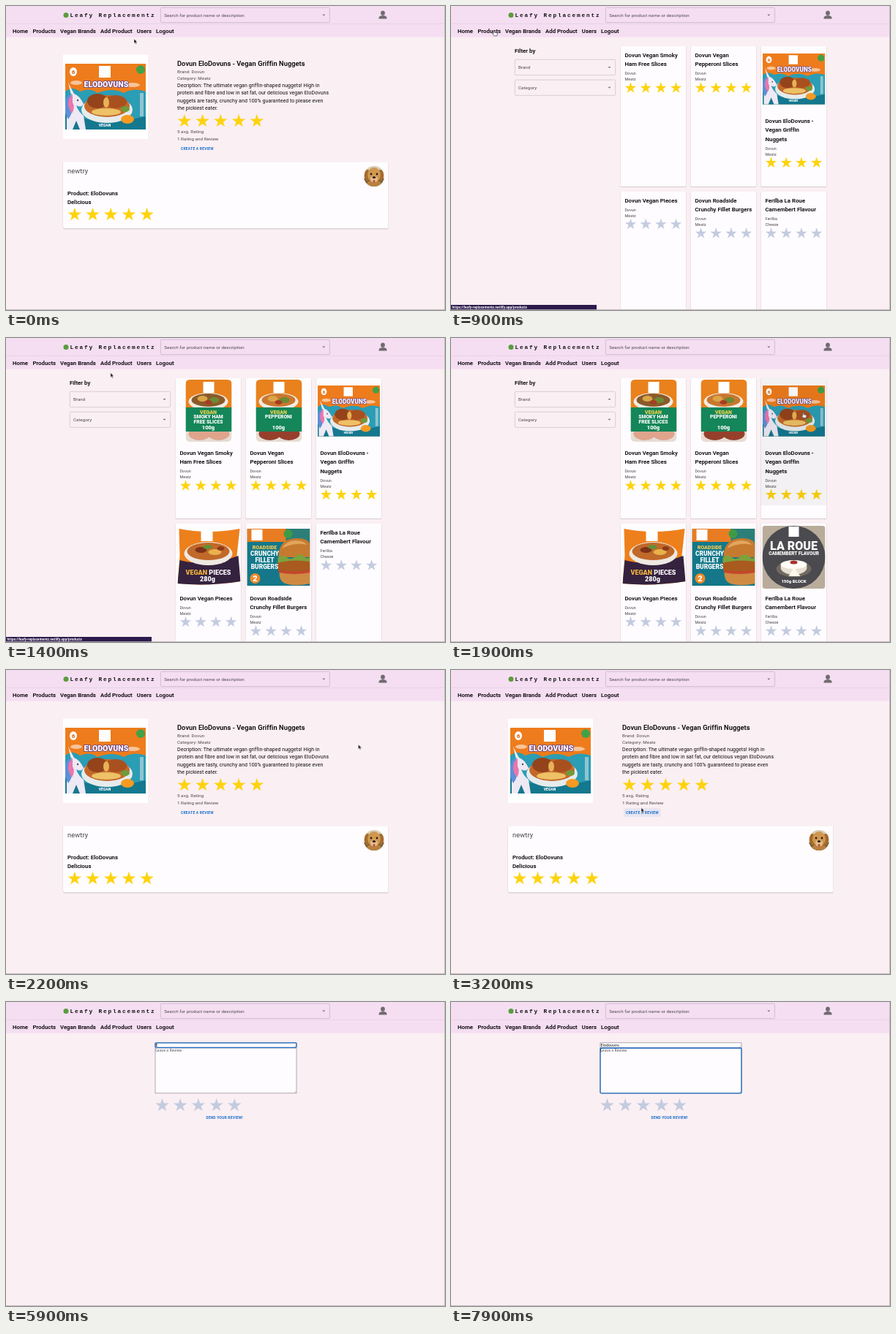
Write an HTML page that moves like this. It is 600 by 416 pixels and loops after 8 s.

```html
<!DOCTYPE html>
<html lang="en">
<head>
<meta charset="utf-8">
<title>Leafy Replacementz</title>
<style>
  html, body { margin: 0; width: 100%; height: 100%; overflow: hidden; background: #faeff3; }
  svg { display: block; width: 100%; height: 100%; }
  text { font-family: Roboto, sans-serif; letter-spacing: .0085em; fill: #0c0a0c; white-space: pre; }
  .grey { fill: #4c464b; }
  .mid { font-weight: 500; fill: #080608; stroke: #080608; stroke-width: .1px; }
  .button { font-weight: 600; fill: #1a6fcb; letter-spacing: .18px; }
  .brand { font: bold 7.8px "Liberation Mono", monospace; letter-spacing: 1.82px; fill: #111; }
  .field, .typed, .status { font-family: "Noto Sans", sans-serif; letter-spacing: 0; }
  .typed { font-weight: 500; fill: #111; }
  .field { fill: #5a565a; }
  .status { font-weight: 600; fill: #fff; }
  .pack { font-weight: 800; fill: #fff; text-anchor: middle; letter-spacing: 0; }
</style>
</head>
<body>
<svg id="stage" viewBox="0 0 600 416" preserveAspectRatio="none"></svg>
<script>
const LOOP = 8000, STEP = 100;
const GOLD = '#fdd30d', PALE = '#c3cbdf';

// Drawing helpers
const text = (x, y, size, str, cls = '', extra = '') =>
  `<text x="${x}" y="${y}" font-size="${size}" class="${cls}" ${extra}>${str}</text>`;
const rect = (x, y, w, h, fill, extra = '') =>
  `<rect x="${x}" y="${y}" width="${w}" height="${h}" fill="${fill}" ${extra}/>`;
const oval = (x, y, rx, ry, fill) =>
  `<ellipse cx="${x}" cy="${y}" rx="${rx}" ry="${ry}" fill="${fill}"/>`;
const path = (d, fill, extra = '') => `<path d="${d}" fill="${fill}" ${extra}/>`;
const group = (id, body) => `<g id="${id}">${body}</g>`;
const outline = (x, y, w, h, color, width = 1) =>
  rect(x, y, w, h, 'none', `rx="1.5" stroke="${color}" stroke-width="${width}"`);
const arrow = (x, y) => path(`M${x - 2} ${y - 1}h4l-2 2z`, '#757075');

function star(x, y, r, fill) {
  const points = Array.from({ length: 10 }, (_, i) => {
    const a = (i / 5 - .5) * Math.PI, d = i % 2 ? r * .39 : r;
    return `${(x + d * Math.cos(a)).toFixed(2)},${(y + d * Math.sin(a)).toFixed(2)}`;
  });
  return `<polygon points="${points.join(' ')}" fill="${fill}"/>`;
}
const stars = (n, x, y, gap, r, fill) =>
  Array.from({ length: n }, (_, i) => star(x + i * gap, y, r, fill)).join('');

const paper = (x, y, w, h) =>
  rect(x - .4, y + .3, w + .8, h + .8, '#00000026', 'rx="1.8"') + rect(x, y, w, h, '#fefcfe', 'rx="1.5"');

// Package pictures
const nuggetBox =
  rect(0, 0, 110, 90, '#ee7c1c') +
  path('M0 38q10-8 20 0q14-6 24 2q20-8 36 0q14-8 30-2V90H0z', '#2b9db4') +
  path('M0 68q50 18 110 4V90H0z', '#14788f') +
  oval(15, 26, 8, 3, '#f9c39a') + oval(92, 29, 10, 3, '#f9c39a') +
  oval(57, 63, 35, 18, '#e6ebec') + oval(57, 58, 31, 15, '#c4682a') +
  oval(44, 51, 14, 10, '#94431b') + oval(69, 52, 15, 9, '#a9501f') +
  oval(56, 66, 20, 5, '#edc166') + oval(82, 62, 6, 4, '#6f9a3a') + oval(56, 53, 4, 7, '#e7b257') +
  path('M2 90V66Q0 50 8 43L4 26L12 41Q19 43 25 55Q22 61 15 57Q18 66 25 71L28 90H20L15 78L10 90z', '#eee9f4') +
  path('M9 41Q-1 44 0 58Q-1 68 4 76Q12 66 8 56Q7 47 9 41z', '#5e8fd8') +
  path('M10 42Q3 47 4 58Q6 64 9 68Q14 60 10 53z', '#e877ac') + oval(17, 50, 1, 1.2, '#3c2c50') +
  rect(46, 3, 16, 16, '#fff') +
  text(56, 32, 10.6, 'ELODOVUNS', 'pack', 'stroke="#67408a" stroke-width="1.6" paint-order="stroke"') +
  oval(11, 11, 5, 6, '#fff') + text(11, 14, 8, '6', 'pack', 'style="fill:#e06a18"') +
  oval(103, 8, 6, 6, '#43a047') + oval(85, 76, 9, 6, '#f59a23') +
  rect(102, 40, 5, 32, '#8fc4d0') + text(54, 86, 5, 'VEGAN', 'pack');

const slicesPack = (filling, slice, lines) =>
  rect(14, 2, 63, 85, '#e6dcd3', 'rx="6"') +
  path('M14 44V8q0-6 6-6h51q6 0 6 6v36z', '#e9811d') +
  oval(45, 32, 27, 12, '#f2ebe2') + oval(45, 30, 23, 9, filling) +
  oval(37, 28, 7, 4, '#d9a548') + oval(53, 30, 7, 4, '#6d8a35') + oval(45, 33, 5, 3, '#a63c24') +
  oval(33, 76, 15, 9, slice) + oval(59, 76, 15, 9, slice) + rect(14, 40, 63, 33, '#148659') +
  rect(38, 5, 15, 15, '#fff') +
  text(45, 48.5, 7, 'VEGAN', 'pack', 'style="fill:#f3d54a"') +
  lines.map((line, i) => text(45, 55 + i * 6.5, 6.8, line, 'pack')).join('') +
  text(45, 70, 7.5, '100g', 'pack');

const piecesPack =
  path('M5 7Q45 15 88 7L84 44L89 79Q45 86 3 82L6 44z', '#ee801c') +
  path('M6 50Q45 60 86 44L89 79Q45 86 3 82z', '#35223f') +
  oval(45, 41, 33, 16, '#eee9e2') + oval(45, 38, 29, 12, '#c0692a') +
  oval(35, 36, 8, 4, '#7d331a') + oval(54, 39, 9, 4, '#e8b14a') +
  oval(44, 32, 6, 3, '#5d9138') + oval(62, 34, 5, 3, '#8f3a1b') +
  rect(35, 8, 16, 16, '#fff') +
  text(45, 69.5, 9, '<tspan fill="#f2b53c">VEGAN</tspan> PIECES', 'pack') + text(44, 78.5, 9, '280g', 'pack');

const burgerPack =
  rect(2, 7, 86, 78, '#e87c22') + rect(2, 25, 86, 60, '#14788a') + rect(55, 7, 33, 30, '#2b7f78') +
  path('M45 44Q46 20 70 20Q85 20 88 28V46H45z', '#c67a30') +
  path('M50 34Q54 24 68 23Q79 23 84 29Q66 25 50 34z', '#e2a55c') +
  path('M44 47q6-6 12-1t12-1t12 0t8-2v11H44z', '#7da23c') +
  path('M43 54q22-6 45-2v14q-24 5-43 0z', '#a85a1f') + path('M46 63q20 5 42 0v5q-22 3-42 0z', '#c4462c') +
  path('M46 67q20 4 42 0v15q-22 5-36-1q-6-4-6-14z', '#cf8a42') +
  rect(8, 8, 15, 15, '#fff') + oval(58, 14, 6, 6, '#3f9a45') +
  ['ROADSIDE', 'CRUNCHY', 'FILLET', 'BURGERS'].map((w, i) =>
    text(26, 35 + i * 9, i ? 8.4 : 7, w, 'pack', i ? '' : 'style="fill:#f6c94c"')).join('') +
  oval(13, 75, 7, 7, '#ef8a28') + text(13, 79, 11, '2', 'pack');

const cheesePack =
  rect(2, 3, 86, 86, '#b9ac9b', 'rx="4"') + oval(45, 46, 43, 43, '#4b4a4e') +
  oval(45, 62, 24, 11, '#70695f') + oval(45, 60, 18, 10, '#e6dfd2') + oval(45, 56, 18, 6, '#fffdf6') +
  path('M45 60L38 72H54z', '#fbf7ea') + oval(45, 53, 5, 2.5, '#a5302c') + rect(38, 4, 14, 14, '#fff') +
  text(45, 35.5, 16, 'LA ROUE', 'pack') + text(45, 42.5, 6.4, 'CAMEMBERT FLAVOUR', 'pack') +
  text(45, 81, 6, '150g BLOCK', 'pack');

// Pages
const products = [
  { title: ['Dovun Vegan Smoky', 'Ham Free Slices'], loaded: 1300, rated: true,
    art: slicesPack('#8a5a2a', '#dfa48c', ['SMOKY HAM', 'FREE SLICES']) },
  { title: ['Dovun Vegan', 'Pepperoni Slices'], loaded: 1300, rated: true,
    art: slicesPack('#c9772f', '#96402c', ['PEPPERONI']) },
  { title: ['Dovun EloDovuns -', 'Vegan Griffin', 'Nuggets'], loaded: 0, rated: true,
    art: '<use href="#nuggets" transform="translate(2.5 10) scale(.773)"/>' },
  { title: ['Dovun Vegan Pieces'], art: piecesPack, loaded: 1400 },
  { title: ['Dovun Roadside', 'Crunchy Fillet Burgers'], art: burgerPack, loaded: 1400 },
  { title: ['Ferilba La Roue', 'Camembert Flavour'], art: cheesePack, loaded: 1500, maker: 'Ferilba', kind: 'Cheeze' },
];

function card({ title, art, rated, maker = 'Dovun', kind = 'Meatz' }, i) {
  const x = 231.5 + i % 3 * 96, y = 55 + Math.floor(i / 3) * 199;
  const base = 15 + title.length * 12.4;
  const info = title.map((line, n) => text(6, 15 + n * 12.4, 7.74, line, 'mid')).join('') +
    text(6, base - .6, 5.4, maker, 'grey') + text(6, base + 7.4, 5.4, kind, 'grey') +
    stars(4, 14, base + 17.4, 20.7, 8.1, rated ? GOLD : PALE);
  return paper(x, y, 89.5, 192) + `<g transform="translate(${x} ${y})">` +
    group('art' + i, art) + group('info' + i, info) +
    (i === 2 ? group('cardHover', rect(0, 0, 89.5, 174, '#0000000b')) : '') + '</g>';
}

const select = (y, label) => outline(87.3, y, 137.4, 21.3, '#d3c5cc', .8) +
  text(92, y + 13, 6.2, label, 'grey') + arrow(216.5, y + 10.7);

const header =
  rect(0, 0, 600, 42.5, '#f5def2') + rect(0, 23.8, 600, .9, '#e6d0e4') +
  oval(82, 12.5, 3.5, 3.5, '#5a9c3c') + text(87.5, 15, 7.8, 'Leafy Replacementz', 'brand') +
  outline(211.4, 2.2, 231, 20.4, '#cdb9cc', .9) +
  text(216.3, 14.6, 6.2, 'Search for product name or description', 'grey') + arrow(434.3, 12.5) +
  oval(515, 9.7, 2.9, 3.1, '#706b70') + path('M509.5 17.6v-1.6q.5-2.8 5.5-3q5 .2 5.5 3v1.6z', '#706b70') +
  [[9, 'Home'], [36.4, 'Products'], [74, 'Vegan Brands'], [129, 'Add Product'], [178.8, 'Users'], [205, 'Logout']]
    .map(([x, label]) => text(x, 36.8, 7.74, label, 'mid')).join('');

const story = ['Decription: The ultimate vegan griffin-shaped nuggets! High in',
  'protein and fibre and low in sat fat, our delicious vegan EloDovuns',
  'nuggets are tasty, crunchy and 100% guaranteed to please even', 'the pickiest eater.'];

const dog = '<clipPath id="round"><circle cx="503" cy="233" r="14"/></clipPath><g clip-path="url(#round)">' +
  rect(489, 219, 28, 28, '#d8cdb4') + rect(489, 236, 28, 11, '#6f5d38') + oval(503, 246, 11, 8, '#b9803f') +
  oval(494, 232, 4, 8, '#a5692c') + oval(512, 232, 4, 8, '#a5692c') + oval(503, 231, 9, 10, '#cf9850') +
  oval(503, 237, 5, 4.5, '#e2bd84') + oval(499, 230, 1.3, 1.4, '#2a1b12') + oval(507, 230, 1.3, 1.4, '#2a1b12') +
  oval(503, 234.5, 2.2, 1.6, '#2a1b12') + oval(503, 240, 1.6, 2, '#c0524e') + '</g>';

const detail =
  rect(78, 66.5, 116, 115.5, '#fff') + '<use href="#nuggets" transform="translate(81 79)"/>' +
  text(234, 81.8, 9.25, 'Dovun EloDovuns - Vegan Griffin Nuggets', 'mid') +
  text(234, 91.6, 6.2, 'Brand: Dovun', 'grey') + text(234, 100.8, 6.2, 'Category: Meatz', 'grey') +
  story.map((line, i) => text(234, 111 + i * 10.4, 6.97, line)).join('') +
  stars(5, 243.8, 157.5, 24.75, 9.7, GOLD) +
  text(234, 174.3, 6.2, '5 avg. Rating', 'grey') + text(234, 183.8, 6.2, '1 Rating and Review', 'grey') +
  group('buttonHover', rect(236, 189, 50.5, 12, '#1976d214', 'rx="1.5"')) +
  text(239, 196.9, 5.03, 'CREATE A REVIEW', 'button') +
  paper(78, 213.3, 444.5, 91) + text(84, 229.3, 9.3, 'newtry', 'grey') + dog +
  text(84, 259, 7.74, 'Product: EloDovuns', 'mid') + text(84, 271.3, 7.74, 'Delicious', 'mid') +
  stars(5, 93.8, 285.5, 24.7, 9.7, GOLD);

const catalogue = text(87, 63.7, 7.74, 'Filter by', 'mid') +
  select(73.3, 'Brand') + select(101.1, 'Category') + products.map(card).join('');

const word = 'Elodovuns';
const keyTimes = [5900, 6000, 6200, 6400, 6700, 6800, 7000, 7200, 7400];
const grip = y => path(`M394 ${y}l2.4-2.4M395.3 ${y}l1.1-1.1`, 'none', 'stroke="#888" stroke-width=".4"');
const form =
  rect(204, 55.8, 193, 6.5, '#fefcfe', 'stroke="#8d898d" stroke-width=".7"') +
  rect(204, 63, 193, 61.8, '#fefcfe', 'stroke="#8d898d" stroke-width=".7"') + grip(61.8) + grip(124.3) +
  text(204.2, 68, 5.1, 'Leave a Review', 'field') +
  [...word].map((_, i) => group('typed' + i, text(204.6, 61, 5.2, word.slice(0, i + 1), 'typed'))).join('') +
  group('titleFocus', outline(204, 55.9, 193, 6.4, '#1f6bc4', 1.3)) +
  group('bodyFocus', outline(204, 63, 193, 61.8, '#1f6bc4', 1.3) + rect(204.6, 63.8, .5, 5, '#111')) +
  stars(5, 213.5, 141.5, 24.7, 9.7, PALE) + text(273.3, 160.4, 5.03, 'SEND YOUR REVIEW!', 'button');

const pointer = group('pointer',
  group('arrow', path('M0 0v6.2l1.5-1.3l1 2.3l1.1-.5l-1-2.2h2z', '#111', 'stroke="#fff" stroke-width=".5"')) +
  group('hand', path('M-.8 0q.9-1 1.6 0v2.2l2.9.7q.8.2.7 1.2l-.6 2.8H0L-2.3 3.9q.3-.9 1.5 0z', '#fff',
    'stroke="#222" stroke-width=".6"')) +
  group('beam', path('M-1-3q1 0 1 .8q0-.8 1-.8M0-2.5v5M-1 3q1 0 1-.8q0 .8 1 .8', 'none',
    'stroke="#222" stroke-width=".6"')));

document.getElementById('stage').innerHTML =
  `<defs><g id="nuggets">${nuggetBox}</g></defs>` + rect(0, 0, 600, 416, '#faeff3') +
  group('detail', detail) + group('catalogue', catalogue) + group('form', form) + header +
  group('status', rect(0, 409, 199, 7, '#2b1a4c') +
    text(1.5, 414.2, 4.3, 'https://leafy-replacementz.netlify.app/products', 'status')) +
  pointer + rect(599.2, 0, .8, 416, '#b9b0b6') + rect(0, 415.2, 600, .8, '#b9b0b6');

// Motion: every part is sampled on the same step clock
function track(id, pose) {
  const frames = [];
  for (let t = 0; t < LOOP; t += STEP) frames.push({ offset: t / LOOP, easing: 'step-end', ...pose(t) });
  frames.push({ ...frames[frames.length - 1], offset: 1 });
  document.getElementById(id).animate(frames, { duration: LOOP, iterations: Infinity });
}
const during = (id, ...spans) =>
  track(id, t => ({ opacity: spans.some(([from, to]) => t >= from && t < to) ? 1 : 0 }));

const route = [[0, 175, 45], [100, 175, 45], [800, 59, 34], [1200, 59, 34], [1900, 481.5, 102.5],
  [2200, 481.5, 102], [3000, 260, 188.5], [3700, 260, 188.5], [4600, 268, 59], [LOOP, 268, 59]];
function pointerAt(t) {
  const i = route.findIndex(stop => stop[0] > t);
  const [t0, x0, y0] = route[i - 1], [t1, x1, y1] = route[i];
  const u = (t - t0) / (t1 - t0), e = u * u * (3 - 2 * u);
  return { transform: `translate(${x0 + (x1 - x0) * e}px, ${y0 + (y1 - y0) * e}px)` };
}

track('pointer', pointerAt);
during('arrow', [0, 700], [1300, 1800], [2100, 4200]);
during('hand', [700, 1300], [1800, 2100]);
during('beam', [4200, 5900]);
during('detail', [0, 900], [2100, 3400]);
during('catalogue', [900, 2100]);
during('form', [3400, LOOP]);
during('status', [800, 1500]);
during('cardHover', [1800, 2100]);
during('buttonHover', [3000, 3400]);
during('titleFocus', [4900, 7900]);
during('bodyFocus', [7900, LOOP]);
keyTimes.forEach((time, i) => during('typed' + i, [time, keyTimes[i + 1] || LOOP]));
products.forEach(({ loaded }, i) => {
  during('art' + i, [loaded, LOOP]);
  track('info' + i, t => ({ transform: `translateY(${t >= loaded ? 90 : 0}px)` }));
});
</script>
</body>
</html>
```
